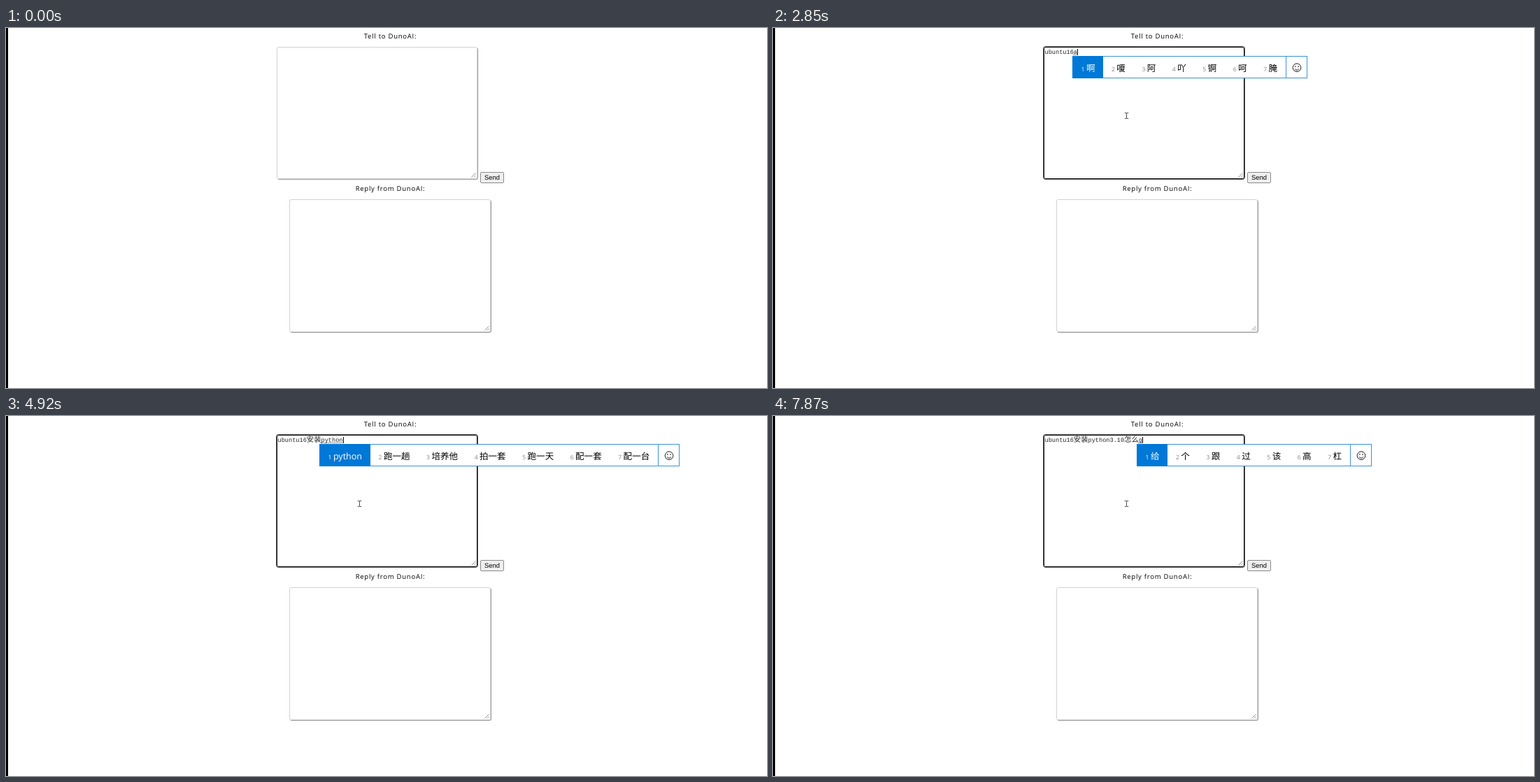
Recreate the animation shown at these times as an HTML page. Size 1088x515 px, loop 8000 ms.

```html
<!DOCTYPE html>
<html lang="en">
<head>
<meta charset="utf-8">
<title>Chat form</title>
<style>
html, body { margin: 0; width: 100%; height: 100%; overflow: hidden; background: #fff; text-rendering: geometricPrecision; }
body { position: relative; }
body > * { position: absolute; box-sizing: border-box; }
.edge { left: 0; top: 0; width: 3px; height: 100%; background: #000; }
.label { left: 400px; width: 299px; text-align: center; color: #000; letter-spacing: .75px; white-space: nowrap;
  font: 500 9.5px/14px 'Open Sans', 'Noto Sans', sans-serif; }
.area { width: 288px; height: 190px; border: 1px solid #d2d2d2; border-radius: 3px; box-shadow: 1px 1px 1px #999; }
.area.focus { border-color: #111; box-shadow: 0 0 0 1px #555; }
#ask { left: 387px; top: 27px; width: 287px; height: 189px; }
#reply { left: 405px; top: 245px; }
.area svg { position: absolute; right: 0; bottom: 0; }
.send { left: 678px; top: 206px; width: 34px; height: 16px; border: 1px solid #8a8a8a; border-radius: 2px; background: #efefef;
  color: #000; text-align: center; font: 9.4px/14px 'Liberation Sans', sans-serif; }
#text { left: 388.5px; top: 29.5px; height: 10px; white-space: pre; color: #222;
  font: 8.62px/10px 'Liberation Mono', 'Noto Sans CJK SC', monospace; }
#text b { font: 300 10.34px/0 'Noto Sans CJK SC', sans-serif; }
#text u { text-decoration: underline dotted 1px #333; text-underline-offset: 1px; text-decoration-skip-ink: none; }
#caret { position: absolute; left: 100%; top: .5px; width: 1px; height: 9px; background: #000; }
#bar { top: 40px; height: 32px; display: flex; overflow: hidden; background: #fff; box-shadow: inset 0 0 0 1px #3b93d8; color: #000;
  white-space: nowrap; font: 12.55px/35px 'Open Sans', 'Noto Sans CJK SC', sans-serif; }
#bar.tall { width: 445px; height: 75px; }
#bar span { height: 32px; padding: 0 11.5px 0 12px; }
#bar span:first-child { padding-left: 12.5px; background: #0078d7; color: #fff; font-weight: 500; }
#bar i { display: inline-block; width: 7.4px; color: #858585; font-style: normal; font-size: 8.6px; }
#bar span:first-child i { color: #fff; }
#bar svg { flex: none; box-sizing: border-box; width: 31.5px; height: 32px; margin-left: auto; border-left: 1px solid #3b93d8; }
#mouse { left: 0; top: 0; overflow: visible; }
</style>
</head>
<body>
<div class="edge"></div>
<div class="label" style="top:4.5px">Tell to DunoAI:</div>
<div class="area" id="ask"></div>
<div class="send">Send</div>
<div class="label" style="top:223px">Reply from DunoAI:</div>
<div class="area" id="reply"></div>
<div id="text"></div>
<div id="bar"></div>
<svg id="mouse" width="10" height="14">
  <path id="arrow" d="M.5 .5V10.5L2.8 8.4 4.4 12 6 11.3 4.5 7.8H7.7Z" fill="#fff" stroke="#000" stroke-width=".8"/>
  <path id="beam" d="M-2.7-4H-.6L0-3.6.6-4H2.7M0-3.6V3.6M-2.7 4H-.6L0 3.6.6 4H2.7" fill="none" stroke="#222" stroke-width=".8"/>
</svg>
<script>
const $ = id => document.getElementById(id);
const LOOP = 8000, FOCUS = 600;
const grip = '<svg width="9" height="9"><path d="M1.5 7.5L7.5 1.5M5 7.5L7.5 5" stroke="#777" stroke-width=".8"/></svg>';
const smile = '<svg viewBox="0 0 31.5 32" fill="none" stroke="#111"><circle cx="15.5" cy="16.7" r="6"/>' +
  '<path d="M12.3 18.5Q15.5 22.2 18.7 18.5"/><path d="M13.3 14.2v1.6M17.7 14.2v1.6" stroke-width="1.4"/></svg>';
document.querySelectorAll('.area').forEach(a => a.innerHTML = grip);

const full = 'ubuntu16安装python3.10怎么';
const u6 = 'U不能听到 U不能听见 U不能停止 U不能停下 U不能谈 U不能听 U不能提';
const py = 'python 跑一趟 培养他 拍一套 跑一天 配一套 配一台';
const a1 = '啊 嗄 阿 吖 锕 呵 腌';
// time, committed letters, composition, candidates, bar x
const steps = [
  [0, 0],
  [1210, 0, 'u', 'u', 386],
  [1440, 0, 'ub', 'ub', 386],
  [1520, 0, 'ubu', 'U不 U部 U步 U布 U补 U捕 U簿', 386],
  [1600, 0, 'ubun', 'U不能 U不难 U不你 U部内 U不那 U补你 U布纳', 386],
  [1680, 0, 'ubunt', u6, 386],
  [1840, 0, 'ubuntu', 'ubuntu', 386],
  [1990, 6],
  [2370, 7],
  [2450, 8],
  [2850, 8, 'a', a1, 428],
  [3080, 8, "a'z", '阿姊 啊咱 啊在 啊这 啊真 啊怎 啊做', 428],
  [3460, 8, 'a', a1, 428],
  [3610, 8, 'an', '按 安 暗 案 岸 俺 氨', 428],
  [3690, 8, "an'z", '安装 安置 按照 暗自 安在 按 安', 428],
  [3770, 8, "an'zh", '安装 安置 按照 按住 暗中 按 安', 428],
  [3920, 8, "an'zhu", '按住 案主 安住 暗柱 安珠 按 安', 428],
  [4000, 8, "an'zhua", '安装 按抓 暗抓 安抓 案抓 按 安', 428],
  [4070, 8, "an'zhuan", '安装 按转 暗转 安转 暗砖 安砖 案卷', 428],
  [4150, 8, "an'zhuang", '安装 安装包 暗装 暗桩 安庄 按装 安状', 428],
  [4230, 10],
  [4300, 10, 'p', '怕 跑 陪 配 拍 片 跟', 448],
  [4540, 10, 'py', '朋友 培养 便宜 拼音 跑院 怕 跑', 448],
  [4620, 10, 'pyt', '跑一趟 培养他 拍一套 跑一天 配一套 配一台 跑一条', 448],
  [4690, 10, 'pyth', py, 448],
  [4840, 10, 'pytho', py, 448],
  [4920, 10, 'python', py, 448],
  [5150, 16],
  [5610, 17],
  [5840, 18],
  [6390, 19],
  [6560, 20],
  [7170, 20, 'z', '在 这 中 就 自 做 最', 500],
  [7400, 20, 'ze', '则 责 泽 择 仄 啧 咋', 500],
  [7550, 20, 'zen', '怎么 怎样 怎能 怎 谮 增 则', 500],
  [7720, 20, "zen'me", '怎么 怎末 怎没 怎 谮 增 则', 500],
  [7800, 22],
  [7870, 22, 'g', '给 个 跟 过 该 高 杠', 520],
];

function showStep([time, count, comp = '', words, x]) {
  const typed = full.slice(0, count).replace(/[一-龥]+/g, '<b>$&</b>');
  $('text').innerHTML = `${typed}<u>${comp}</u><span id="caret"></span>`;
  $('bar').style.display = words ? 'flex' : 'none';
  if (!words) return;
  $('bar').style.left = x + 'px';
  $('bar').className = comp.length < 3 && x === 386 ? 'tall' : '';
  $('bar').innerHTML = words.split(' ').map((w, i) => `<span><i>${i + 1}</i>${w}</span>`).join('') + smile;
}

const inside = (x, y, l, t) => x > l && x < l + 288 && y > t && y < t + 190;

function showMouse(t) {
  const k = Math.min(6, Math.floor((t - 70) / 76)) / 6;
  const p = k * k * (3 - 2 * k);
  const x = 842 - 336.5 * p, y = 432 - 306.5 * p;
  const beam = inside(x, y, 387, 26) || inside(x, y, 405, 245);
  $('mouse').style.display = t < 70 ? 'none' : 'block';
  $('mouse').style.transform = `translate(${x}px, ${y}px)`;
  $('beam').style.display = beam ? '' : 'none';
  $('arrow').style.display = beam ? 'none' : '';
}

let shown;
function draw(now) {
  const t = now % LOOP;
  const step = steps.findLast(s => s[0] <= t);
  if (step !== shown) showStep(shown = step);
  const blink = (t >= 1060 && t < 1210) || (t >= 7090 && t < 7170);
  $('caret').style.display = t < FOCUS || blink ? 'none' : '';
  $('ask').classList.toggle('focus', t >= FOCUS);
  showMouse(t);
  requestAnimationFrame(draw);
}
draw(performance.now());
</script>
</body>
</html>
```
